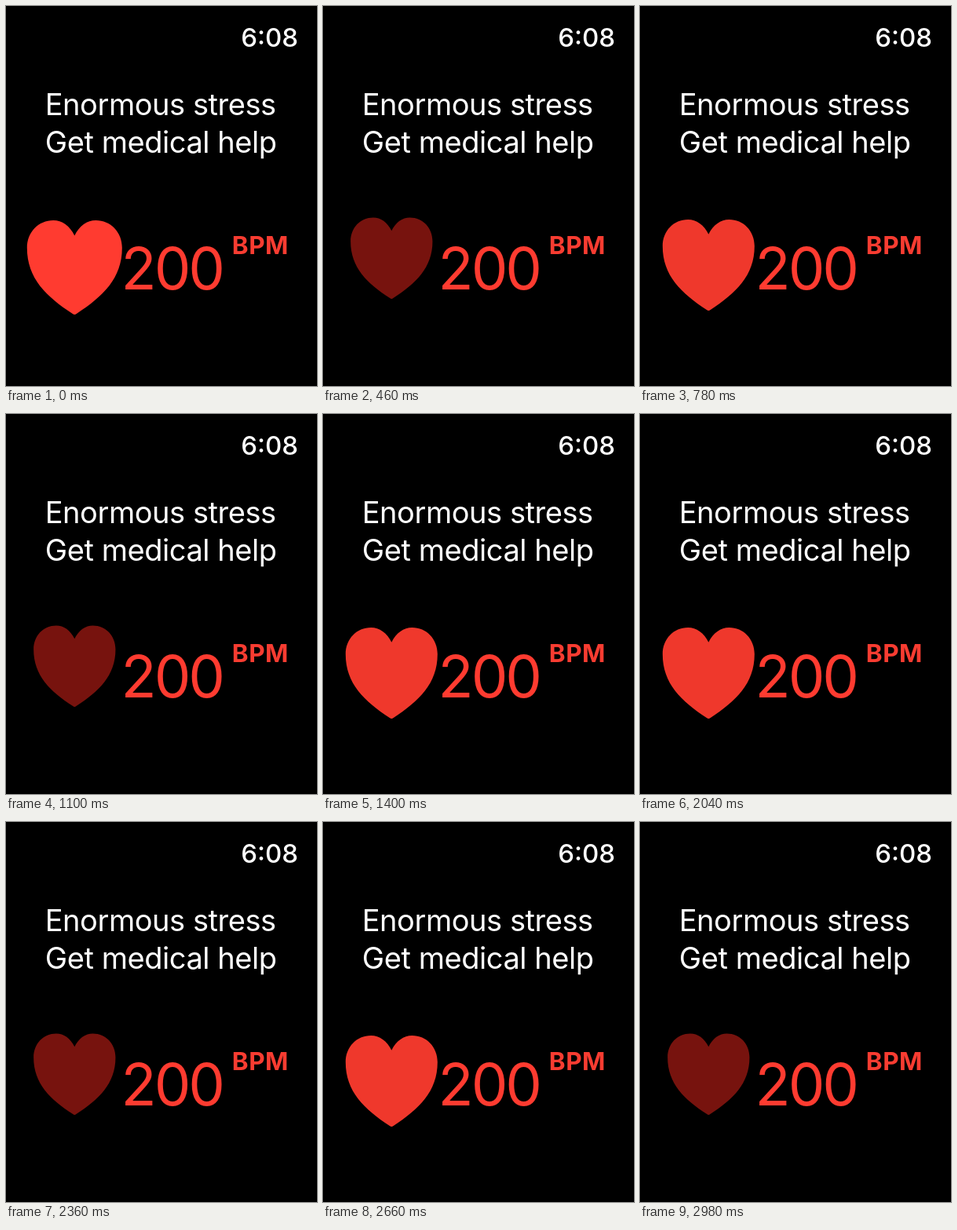
An HTML page for the animation above (3080 ms loop, 396 by 484 pixels).

```html
<!DOCTYPE html>
<html lang="en">
<head>
<meta charset="utf-8">
<title>Heart rate</title>
<style>
  html, body { margin: 0; width: 100%; height: 100%; overflow: hidden; background: #000; }
  svg { display: block; width: 396px; height: 484px; font-family: Inter, sans-serif; }
  .clock { font-size: 33px; font-weight: 500; fill: #fff; text-anchor: end; }
  .message { font-size: 38px; letter-spacing: -.45px; fill: #fff; text-anchor: middle; }
  .rate { font-size: 74px; letter-spacing: -3px; fill: #ff3b30; }
  .unit { font-size: 31.5px; font-weight: 700; letter-spacing: .5px; fill: #f83c31; }
</style>
</head>
<body>
<svg viewBox="0 0 396 484">
  <text class="clock" x="372" y="52">6:08</text>
  <text class="message" x="196.7" y="139">Enormous stress</text>
  <text class="message" x="197.2" y="187">Get medical help</text>
  <path id="heart" d="M0 19.5C-6 7 -16 0 -27 0C-46 0 -60.5 15 -60.5 35C-60.5 74 -36 97 -2.5 119Q0 121 2.5 119C36 97 60.5 74 60.5 35C60.5 15 46 0 27 0C16 0 6 7 0 19.5Z"/>
  <text class="rate" x="146.5" y="360.5">200</text>
  <text class="unit" x="287.8" y="315.5">BPM</text>
</svg>
<script>
  const LOOP = 3080;
  const heart = document.getElementById('heart');

  const full = { top: 273, scale: 1, color: '#ff3b30' };
  const bright = { top: 272, scale: 0.967, color: '#ef382c' };
  const dim = { top: 269.5, scale: 0.862, color: '#77130e' };

  // After the opening pose the heart alternates at each of these times.
  const beats = [140, 460, 780, 1100, 1400, 1720, 2040, 2360, 2660, 2980];

  function poseAt(time) {
    const count = beats.filter(beat => beat <= time).length;
    if (count === 0) return full;
    return count % 2 ? bright : dim;
  }

  function draw() {
    const { top, scale, color } = poseAt(performance.now() % LOOP);
    heart.setAttribute('transform', `translate(87.3 ${top}) scale(${scale})`);
    heart.setAttribute('fill', color);
    requestAnimationFrame(draw);
  }
  draw();
</script>
</body>
</html>
```
